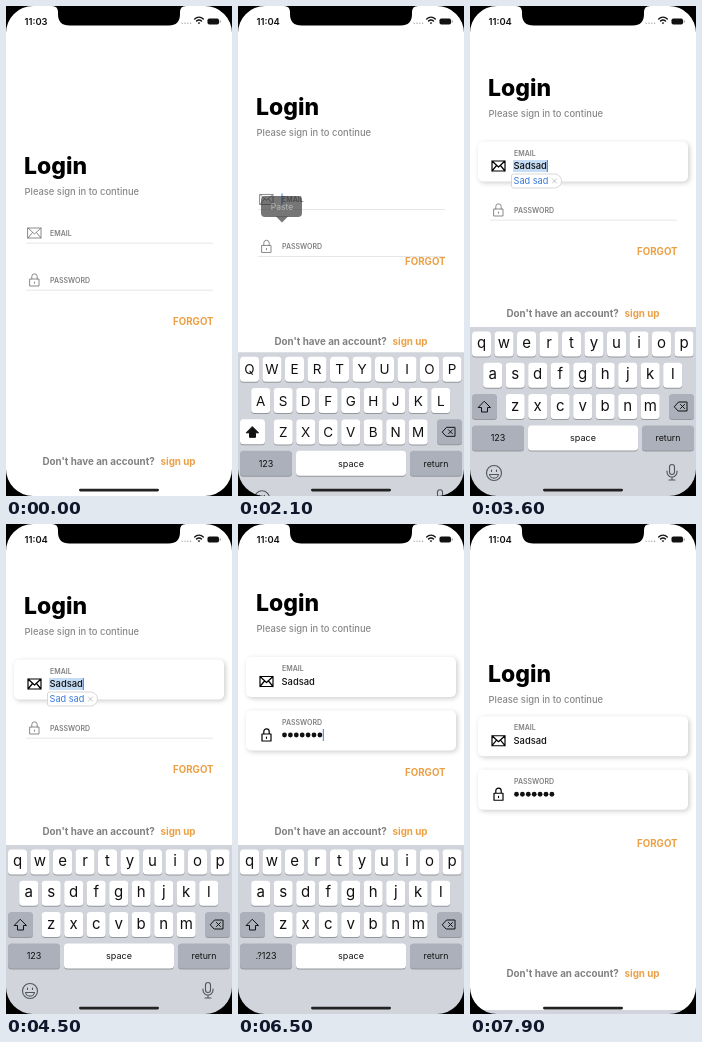
Write an HTML page with a canvas that moves like this. It is 226 by 490 pixels and loops after 8 s.

```html
<!DOCTYPE html>
<html>
<head>
<meta charset="utf-8">
<style>
html, body { margin: 0; width: 100%; height: 100%; overflow: hidden; background: #000; }
canvas { display: block; width: 226px; height: 490px; }
</style>
</head>
<body>
<canvas></canvas>
<script>
const W = 226, H = 490, LOOP = 8000;
const ORANGE = '#eba045', BLUE = '#3b7ad8';
const KEYBOARD_OPEN = 1890, KEYBOARD_CLOSE = 7580, SLIDE = 450;
const TYPE_EMAIL = 2900, FOCUS_PASSWORD = 4600, TYPE_PASSWORD = 5650, KEY_TIME = 110;

const canvas = document.querySelector('canvas');
const ctx = canvas.getContext('2d');
const dpr = window.devicePixelRatio || 1;
canvas.width = W * dpr;
canvas.height = H * dpr;

const clamp = v => Math.min(1, Math.max(0, v));
const smooth = p => p * p * (3 - 2 * p);
const ramp = (t, start, length) => smooth(clamp((t - start) / length));
const easeOut = power => p => 1 - (1 - p) ** power;
const openness = (t, ease) =>
  ease(clamp((t - KEYBOARD_OPEN) / SLIDE)) - ease(clamp((t - KEYBOARD_CLOSE) / SLIDE));
const typed = (t, start, max) => Math.max(0, Math.min(max, Math.floor((t - start) / KEY_TIME) + 1));

// y is the middle of the capital letters
function text(str, x, y, size, weight, color, align = 'left') {
  ctx.font = `${weight} ${size}px Inter, sans-serif`;
  ctx.textAlign = align;
  ctx.fillStyle = color;
  ctx.fillText(str, x, y + size * 0.364);
}

function box(x, y, w, h, r, fill) {
  ctx.beginPath();
  ctx.roundRect(x, y, w, h, r);
  if (fill) { ctx.fillStyle = fill; ctx.fill(); }
}

function path(d, x, y, { stroke, fill, width = 1 }) {
  const p = new Path2D(d);
  ctx.save();
  ctx.translate(x, y);
  ctx.lineWidth = width;
  ctx.lineJoin = ctx.lineCap = 'round';
  if (fill) { ctx.fillStyle = fill; ctx.fill(p); }
  if (stroke) { ctx.strokeStyle = stroke; ctx.stroke(p); }
  ctx.restore();
}

function withAlpha(alpha, draw) {
  if (alpha <= 0) return;
  ctx.save();
  ctx.globalAlpha = alpha;
  draw();
  ctx.restore();
}

const ENVELOPE = 'M-6.5 -5H6.5V5H-6.5Z L0 1 L6.5 -5 M-6.5 5L-2 -.5 M6.5 5L2 -.5';
const LOCK = 'M-4.5 -1H4.5V6H-4.5Z M-2.7 -1V-3.5A2.7 2.7 0 0 1 2.7 -3.5V-1 M0 2V3.3';
const SHIFT = 'M0 -5.5L6 .5H3V5H-3V.5H-6Z';
const DELETE = 'M-6.5 0L-2.5 -4.5H6V4.5H-2.5Z M-.5 -2L3.5 2 M3.5 -2L-.5 2';

function caret(t, x, y) {
  if (t % 1000 < 650) box(x, y - 6, 1, 12, 0, BLUE);
}

function field(label, icon, y, active) {
  withAlpha(1 - active, () => box(20, y + 9.7, 187, 0.8, 0, '#dedede'));
  withAlpha(active, () => {
    ctx.shadowColor = 'rgba(0,0,0,.2)';
    ctx.shadowBlur = 5 * dpr;
    ctx.shadowOffsetX = ctx.shadowOffsetY = 1.5 * dpr;
    box(8, y - 17.5, 210, 40, 5, '#fff');
  });
  const tone = Math.round(125 * (1 - active));
  path(icon, 28.5, y + 7 * active, { stroke: `rgb(${tone},${tone},${tone})`, width: 0.9 + 0.3 * active });
  text(label, 44, y - 6 * active, 7, 600, '#808080');
}

function emailValue(t, y, count) {
  const value = 'Sadsad'.slice(0, count);
  const focused = t > KEYBOARD_OPEN - 150 && t < FOCUS_PASSWORD;
  const suggesting = focused && count === 6;
  const textY = count ? y + 7 : y;
  if (suggesting) box(43, textY - 6, 34, 12, 0, '#c5dcf5');
  text(value, 43.5, textY, 9.4, 500, '#111');
  if (focused) caret(t, 43.5 + ctx.measureText(value).width, textY);
  if (suggesting) {
    box(41.5, y + 15, 50, 14, [2, 7, 7, 2], '#fff');
    ctx.strokeStyle = '#cfcfcf';
    ctx.lineWidth = 0.8;
    ctx.stroke();
    text('Sad sad', 43.5, y + 22, 9.2, 400, BLUE);
    path('M-2 -2L2 2M2 -2L-2 2', 84.5, y + 22, { stroke: '#b5b5b5', width: 0.8 });
  }
}

function passwordValue(t, y, count) {
  const textY = count ? y + 7 : y;
  for (let i = 0; i < count; i++) {
    ctx.beginPath();
    ctx.arc(46.5 + i * 5.9, textY, 2.4, 0, 7);
    ctx.fillStyle = '#111';
    ctx.fill();
  }
  if (t > FOCUS_PASSWORD && t < KEYBOARD_CLOSE) caret(t, count ? 43.5 + count * 5.9 : 43.5, textY);
}

function pasteBubble(t) {
  withAlpha(ramp(t, 1700, 100) - ramp(t, 2000, 250), () => {
    box(23, 190, 41, 21, 4, '#2b2b2b');
    path('M-6 0H6L0 6Z', 44, 210.5, { fill: '#2b2b2b' });
    text('Paste', 44, 200.5, 8.5, 400, '#ddd', 'center');
  });
}

function key(x, y, w, label, size, fill = '#fff') {
  box(x, y + 1, w, 25, 3.5, '#94979c');
  box(x, y, w, 25, 3.5, fill);
  if (label) text(label, x + w / 2, y + 12.5, size, 400, '#111', 'center');
}

function keyboard(top, upper, secure) {
  const gray = '#abb0ba';
  ctx.save();
  ctx.translate(0, top);
  box(0, 0, W, 170, 0, '#d1d4da');
  ['QWERTYUIOP', 'ASDFGHJKL', 'ZXCVBNM'].forEach((row, r) => {
    const left = [2, 13.2, 35.7][r], y = 4.5 + r * 31.3;
    [...row].forEach((c, i) => {
      key(left + i * 22.5, y, 19);
      text(upper ? c : c.toLowerCase(), left + i * 22.5 + 9.5, y + (upper ? 12.5 : 11),
        upper ? 13.5 : 15, 400, '#111', 'center');
    });
  });
  key(2, 67, 25, '', 0, upper ? '#fff' : gray);
  path(SHIFT, 14.5, 80, { stroke: '#111', fill: upper && '#111' });
  key(199, 67, 25, '', 0, gray);
  path(DELETE, 211, 79.5, { stroke: '#111' });
  key(2, 98.5, 52, secure ? '.?123' : '123', 9, gray);
  key(58, 98.5, 110, 'space', 9);
  key(172, 98.5, 52, 'return', 8.8, gray);
  if (!secure) {
    const style = { stroke: '#50555c', width: 1.1 };
    path('M7.5 0A7.5 7.5 0 1 1 -7.5 0A7.5 7.5 0 1 1 7.5 0 M-4.5 1.5A4.6 4.6 0 0 0 4.5 1.5Z M-2.5 -3V-1.5 M2.5 -3V-1.5', 24, 146, style);
    path('M-2.5 -5A2.5 2.5 0 0 1 2.5 -5V0A2.5 2.5 0 0 1 -2.5 0Z M-5 -1V0A5 5 0 0 0 5 0V-1 M0 5V8 M-3 8H3', 202, 145, style);
  }
  ctx.restore();
}

function statusBar(t) {
  text(t < 1100 ? '11:03' : '11:04', 18.5, 15.5, 9.4, 600, '#111');
  for (let i = 0; i < 4; i++) box(175.5 + i * 2.8, 16.5, 1.4, 1.4, 0.7, '#aaa');
  path('M-4.3 -1.6A6.2 6.2 0 0 1 4.3 -1.6 M-2.5 .6A3.6 3.6 0 0 1 2.5 .6', 193, 14.5, { stroke: '#111', width: 1.4 });
  path('M-1.3 2.3A2 2 0 0 1 1.3 2.3L0 3.8Z', 193, 14.5, { fill: '#111' });
  box(201.5, 12.5, 11.5, 6, 1.8, '#111');
  box(213.6, 14.2, 1, 2.6, 0.5, '#888');
}

function bezel() {
  box(73, 482.7, 80, 2.8, 1.4, '#222');
  ctx.beginPath();
  ctx.rect(0, 0, W, H);
  ctx.roundRect(0, 0, W, H, 27);
  ctx.fillStyle = '#000';
  ctx.fill('evenodd');
  path('M46 0Q52 0 52 6V8Q52 19.5 63.5 19.5H162.5Q174 19.5 174 8V6Q174 0 180 0Z', 0, 0, { fill: '#000' });
}

function draw(t) {
  ctx.setTransform(dpr, 0, 0, dpr, 0, 0);
  box(0, 0, W, H, 0, '#fff');

  const emailCount = typed(t, TYPE_EMAIL, 6), passCount = typed(t, TYPE_PASSWORD, 7);
  const a1 = ramp(t, TYPE_EMAIL, 200), a2 = ramp(t, TYPE_PASSWORD, 200);
  const lift = openness(t, easeOut(2.6));
  const fieldLift = 74 * openness(t, smooth);

  const titleY = 160 - 73.5 * lift - 5 * a1 - 3 * a2;
  text('Login', 18, titleY, 23, 800, '#000');
  text('Please sign in to continue', 18.5, titleY + 26, 9.4, 500, '#888');

  const emailY = 227 - fieldLift - 2.5 * a2, passY = 274 - fieldLift + 4 * a1;
  field('EMAIL', ENVELOPE, emailY, a1);
  field('PASSWORD', LOCK, passY, a2);
  passwordValue(t, passY, passCount);
  emailValue(t, emailY, emailCount);

  text('FORGOT', 207.5, 315.5 - 74 * lift + 4 * a1 + 3 * a2, 9.7, 700, ORANGE, 'right');
  const footerY = 455 - 148 * lift;
  text("Don't have an account?", 36.5, footerY, 9.8, 700, '#808080');
  text('sign up', 154.5, footerY, 9.8, 700, ORANGE);

  pasteBubble(t);
  keyboard(H - 169 * openness(t, easeOut(3)), !emailCount, t > FOCUS_PASSWORD);
  statusBar(t);
  bezel();
}

function loop(now) {
  draw(now % LOOP);
  requestAnimationFrame(loop);
}
requestAnimationFrame(loop);
</script>
</body>
</html>
```
